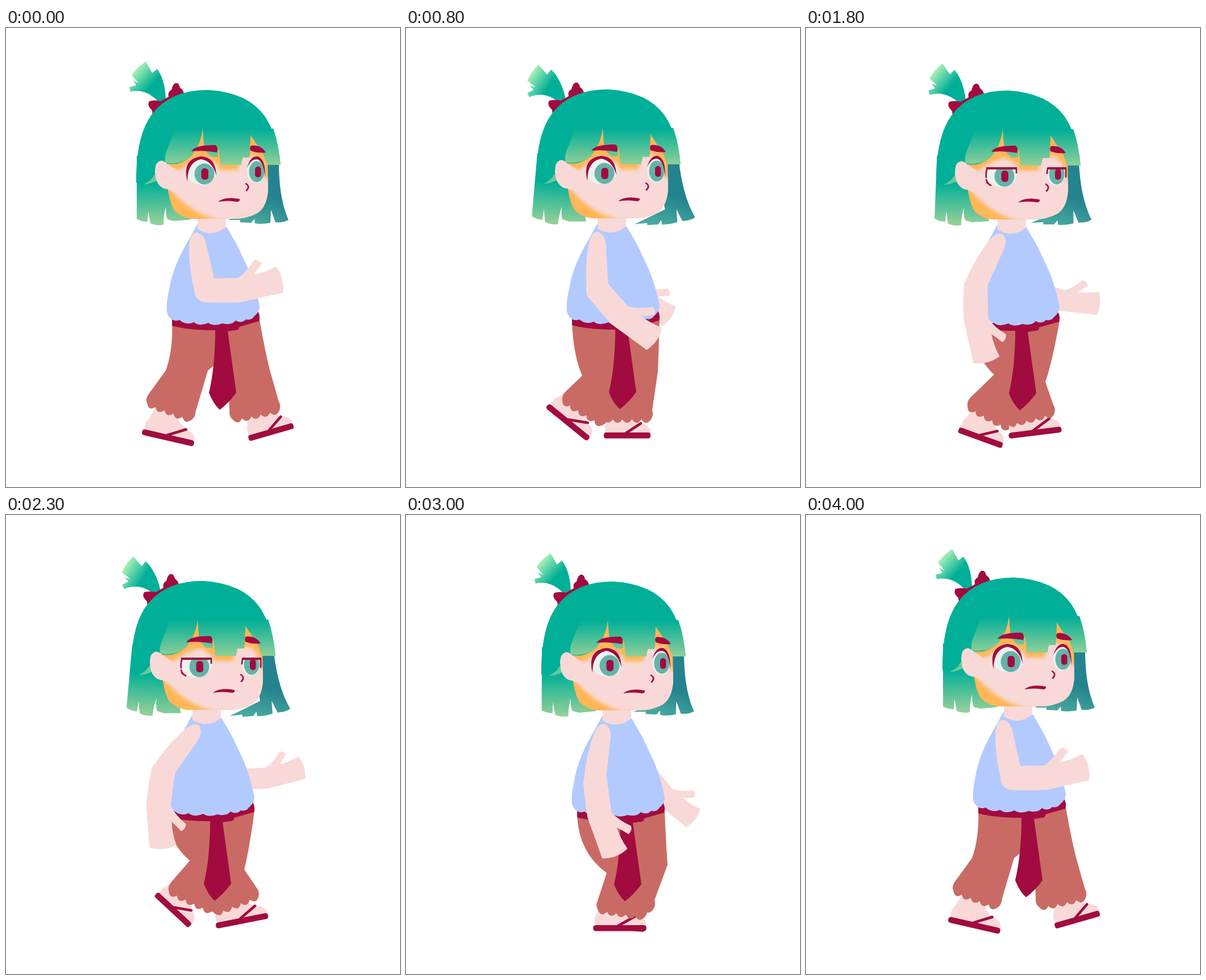
Animation of 693x808 px, one loop 4.1 s. Source, as an HTML page:

```html
<!DOCTYPE html>
<html lang="en">
<head>
<meta charset="utf-8">
<title>Walk cycle</title>
<style>
html, body { margin: 0; width: 100%; height: 100%; overflow: hidden; background: #fff }
svg { display: block; width: 693px; height: 808px }
.skin { fill: #f8d9d7 } .dark { fill: #a20b3f } .teal { fill: #00af97 }
.pants { fill: #c96b64 } .shirt { fill: #b3caff } .white { fill: #ecf2ef } .iris { fill: #64b3a9 }
.line { fill: none; stroke: #a20b3f; stroke-width: 2.6; stroke-linecap: round }
.strap { fill: none; stroke: #a20b3f; stroke-width: 4.6; stroke-linecap: round }
</style>
</head>
<body>
<svg viewBox="0 0 693 808">
<defs>
  <linearGradient id="bangs" gradientUnits="userSpaceOnUse" x1="0" y1="178" x2="0" y2="243">
    <stop stop-color="#00af97"/><stop offset="1" stop-color="#95d098"/></linearGradient>
  <linearGradient id="back" gradientUnits="userSpaceOnUse" x1="0" y1="272" x2="0" y2="345">
    <stop stop-color="#00af97"/><stop offset="1" stop-color="#95d098"/></linearGradient>
  <linearGradient id="farBack" gradientUnits="userSpaceOnUse" x1="466" y1="298" x2="448" y2="346">
    <stop stop-color="#24838f"/><stop offset="1" stop-color="#46a79e"/></linearGradient>
  <linearGradient id="tail" gradientUnits="userSpaceOnUse" x1="231" y1="72" x2="258" y2="98">
    <stop stop-color="#a5efb5"/><stop offset="1" stop-color="#00af97"/></linearGradient>
  <filter id="soft"><feGaussianBlur stdDeviation="3"/></filter>
  <path id="faceShape" d="M284 245L298 170H440L460 225L461 285Q459 315 442 326Q424 336 400 336H326Q303 332 294 318Q286 300 284 278Z"/>
  <clipPath id="faceClip"><use href="#faceShape"/></clipPath>
  <clipPath id="lidClip"><path d="M300 246H480V300H300Z"/></clipPath>
  <g id="forearm" class="skin">
    <circle cx="352" cy="462" r="21"/>
    <path d="M352 441L408 440Q424 429 436 409Q444 407 450 415Q442 425 436 434Q454 431 475 420Q490 439 487 466L412 483Q380 484 352 483Z"/>
  </g>
  <g id="foot">
    <path class="skin" d="M-37 -3Q-42 -15 -36 -24L-28 -48H4L13 -30L25 -21Q41 -18 41 -3Z"/>
    <path class="strap" d="M-2 -4L24 -21"/>
    <rect class="dark" x="-41" y="-5" width="82" height="10.5" rx="4"/>
  </g>
  <g id="eyeballs">
    <ellipse class="white" cx="344" cy="253" rx="27" ry="23"/>
    <ellipse class="iris" cx="349" cy="257" rx="17.5" ry="18.5"/>
    <rect class="dark" x="343.500" y="247" width="12.500" height="20" rx="5.500"/>
    <ellipse class="white" cx="440" cy="252" rx="16" ry="21"/>
    <ellipse class="iris" cx="441" cy="253" rx="13.500" ry="18.500"/>
    <rect class="dark" x="438" y="244" width="10.500" height="19" rx="5"/>
  </g>
</defs>

<g id="body">
  <path id="farHair" fill="url(#farBack)" d="M440 238H480Q480 300 497 338Q488 343 474 342L466 320L465 343Q450 346 438 344L437 336L431 343L412 342V338L390 338L446 318Z"/>
  <use id="farArm" href="#forearm"/>
  <use id="farFoot" href="#foot"/>
  <path id="farLeg" class="pants"/>
  <use id="nearFoot" href="#foot"/>
  <path id="nearLeg" class="pants"/>
  <path class="dark" d="M292 508L443 498Q448 508 445 516L410 526Q411 532 403 532L390 534L405 642Q392 660 376 672Q364 661 357 642Q368 595 368 532Q320 532 292 524Z"/>
  <path class="shirt" d="M336 346Q361 364 388 350L408 385L428 428Q440 458 446 490Q446 500 436 508Q432 515 422 513Q414 521 404 515Q396 524 381 520Q365 526 356 519Q341 526 330 518Q317 524 305 514Q292 519 284 504Q280 490 287 460Q293 420 322 372Z"/>
  <path class="skin" d="M337 330H387V350Q364 370 337 354Z"/>
  <g id="nearArm">
    <path class="skin" d="M322 388Q323 360 335 360Q350 362 354 388L366 441Q374 470 352 483Q338 482 334 472Q322 430 322 388Z"/>
    <use id="nearForearm" href="#forearm"/>
  </g>

  <path id="nearHair" fill="url(#back)" d="M230 225V336Q238 341 249 341L250 322L254 344Q266 349 277 346Q277 330 281 315Q281 330 284 337L296 340L326 337L300 240Z"/>
  <path id="ponytail" fill="url(#tail)" d="M281 126Q280 92 266 72L257 79L246 59Q230 69 221 83L233 97L223 92L229 101L217 104L219 112Q247 106 269 131Z"/>
  <path class="dark" d="M258 155L257 145Q247 136 252 129Q262 126 272 129L286 121Q284 112 291 109Q294 96 300 97Q304 97 306 105Q314 110 313 120Z"/>
  <use href="#faceShape" fill="#ffb657"/>
  <g clip-path="url(#faceClip)">
    <path class="skin" filter="url(#soft)" d="M270 250L305 250Q330 230 352 228L372 240L376 250H409L412 225H438L452 238L455 264H475V345L372 338Q320 324 286 280Z"/>
  </g>
  <path class="teal" d="M229 272Q228 188 258 150Q290 109 355 109Q425 113 455 155Q476 186 483 241H460L453 222L430 188L428 228H416L413 241H378L374 208L372 227H362L349 214L346 175Q343 206 325 226Q305 244 283 238L268 236L264 262Q254 268 242 275Z"/>
  <path fill="url(#bangs)" d="M298 177H470Q480 205 483 241H460L453 222L430 188L428 228H416L413 241H378L374 208L372 227H362L349 214L346 175Q343 206 325 226Q308 242 281 237Q277 228 285 210Z"/>
  <path fill="#6dc898" d="M242 275Q256 269 261 258L267 268Q254 275 242 275Z"/>
  <path class="skin" d="M285 240Q272 227 264 240Q260 252 264 267Q270 283 285 284L300 290V250Z"/>

  <g id="openEyes">
    <use href="#eyeballs"/>
    <path class="dark" d="M319 270Q309 231 343 226Q369 227 370 260Q363 234 343 231Q319 236 319 270ZM424 246Q430 225 442 226Q457 230 456 264Q453 233 441 231Q431 231 424 246Z"/>
  </g>
  <g id="halfEyes">
    <g clip-path="url(#lidClip)"><use href="#eyeballs" y="3"/></g>
    <path class="line" stroke-width="3" d="M317 262Q316 252 319 246H370V254M424 255L425 246H457V261M317 266Q319 273 325 276M318 271L323 275"/>
    <path class="dark" d="M317 244H371V248H317ZM425 244H458V248H425Z"/>
  </g>
  <path class="dark" d="M326 217Q332 206 368 206Q374 209 371 219Q350 215 326 217ZM431 207Q448 205 457 219Q444 221 430 216Q428 209 431 207ZM373 306Q385 296 411 301Q412 305 407 306Q390 303 373 306Z"/>
  <path class="line" d="M422 274Q430 279 423 286"/>
</g>
</svg>

<script>
const LOOP = 4100, STEP = 100;
const poseTimes = [0, 800, 1200, 1800, 2300, 3000, 4000];
const swayTimes = [0, 300, 600, 800, 1200, 1500, 1800, 2300, 2450, 3000, 3500, 4000];
const $ = id => document.getElementById(id);
const put = (id, transform) => $(id).setAttribute('transform', transform);

// Smooth curve through keys, at rest at both ends
function curve(times, values) {
  const last = times.length - 1;
  const slope = i => i % last ? (values[i + 1] - values[i - 1]) / (times[i + 1] - times[i - 1]) : 0;
  return t => {
    if (t >= times[last]) return values[last];
    const i = times.findIndex(time => time > t) - 1;
    const span = times[i + 1] - times[i], u = (t - times[i]) / span, v = 1 - u;
    return v * v * ((1 + 2 * u) * values[i] + u * span * slope(i))
         + u * u * ((1 + 2 * v) * values[i + 1] - v * span * slope(i + 1));
  };
}
const pose = (...values) => curve(poseTimes, values);
const sway = (...values) => curve(swayTimes, values);

const bodyX = sway(0, -2, -3, 0, 3, 3, 0, -9, -12, 9, 10, 11);
const bodyY = sway(0, 0, -1, -1, -2, -5, 1, 7, 8, 8, 5, 1);
const spread = sway(0, .5, 1.25, 1, .45, .1, .45, 1.05, 1.05, .05, .9, 0);
const upperArm = pose(0, 9.5, 13, 37, 47.5, 19, 0);
const elbow = pose(0, 39.5, 64, 53, 51, 64, 0);
const farArm = {
  x: pose(330, 378, 395, 403, 419, 415, 330),
  y: pose(430, 435, 444, 463, 458, 448, 430),
  turn: pose(75, 49, 46, 19, -2, 52, 75)
};
const legs = {
  near: {
    size: 1.14,
    kneeX: pose(318, 347, 366, 384, 391, 381, 318),
    kneeY: pose(603, 613, 622, 622, 617, 622, 603),
    hemX: pose(288, 312, 350, 395, 413, 370, 288),
    hemY: pose(672, 675, 680, 684, 676, 690, 672),
    hemTurn: pose(20, 31, 21, -14, -22, 8, 20),
    footX: pose(285, 285, 322, 403, 424, 367, 285),
    footY: pose(721, 695, 707, 711, 707, 719, 721),
    footTurn: pose(13, 39, 33, -7, -11, 0, 13)
  },
  far: {
    size: 1,
    kneeX: pose(427, 406, 378, 371, 374, 414, 427),
    kneeY: pose(602, 606, 624, 606, 596, 608, 602),
    hemX: pose(439, 389, 352, 322, 334, 384, 439),
    hemY: pose(678, 686, 690, 682, 670, 682, 678),
    hemTurn: pose(-12, 0, 5, 28, 25, 0, -12),
    footX: pose(466, 389, 344, 307, 303, 370, 466),
    footY: pose(711, 718, 727, 720, 688, 717, 711),
    footTurn: pose(-16, 0, 0, 20, 43, 5, -16)
  }
};

function drawLeg(side, t) {
  const leg = legs[side], x = leg.kneeX(t), y = leg.kneeY(t);
  const turn = leg.hemTurn(t) * Math.PI / 180, cos = Math.cos(turn), sin = Math.sin(turn);
  const hem = (dx, dy) => `${leg.hemX(t) + dx * cos - dy * sin} ${leg.hemY(t) + dx * sin + dy * cos}`;
  let d = `M292 518Q294 ${y - 36} ${x - 37} ${y}L${hem(-44, -14)}Q${hem(-47, -4)} ${hem(-42, 2)}`;
  for (let dx = -42; dx < 40; dx += 16.8) d += `Q${hem(dx + 8, 16)} ${hem(dx + 16.8, 4)}`;
  d += `Q${hem(47, -4)} ${hem(44, -12)}L${x + 37} ${y}Q${(x + 483) / 2} ${y - 36} 446 514Z`;
  $(side + 'Leg').setAttribute('d', d);
  put(side + 'Foot', `translate(${leg.footX(t)} ${leg.footY(t)}) rotate(${leg.footTurn(t)}) scale(${leg.size} 1)`);
}

function draw() {
  const t = Math.floor(performance.now() % LOOP / STEP) * STEP;
  const s = spread(t), tired = t >= 1500 && t < 2700;
  put('body', `translate(${bodyX(t)} ${bodyY(t)})`);
  put('nearHair', `rotate(${5 * s} 270 235)`);
  put('farHair', `rotate(${-6.5 * s} 470 235)`);
  put('ponytail', `rotate(${-11 * s} 273 128)`);
  put('nearArm', `rotate(${upperArm(t)} 337 378)`);
  put('nearForearm', `rotate(${elbow(t)} 352 462)`);
  put('farArm', `translate(${farArm.x(t)} ${farArm.y(t)}) rotate(${farArm.turn(t)}) scale(.86) translate(-352 -462)`);
  drawLeg('far', t);
  drawLeg('near', t);
  $('openEyes').style.display = tired ? 'none' : '';
  $('halfEyes').style.display = tired ? '' : 'none';
  requestAnimationFrame(draw);
}
draw();
</script>
</body>
</html>
```
